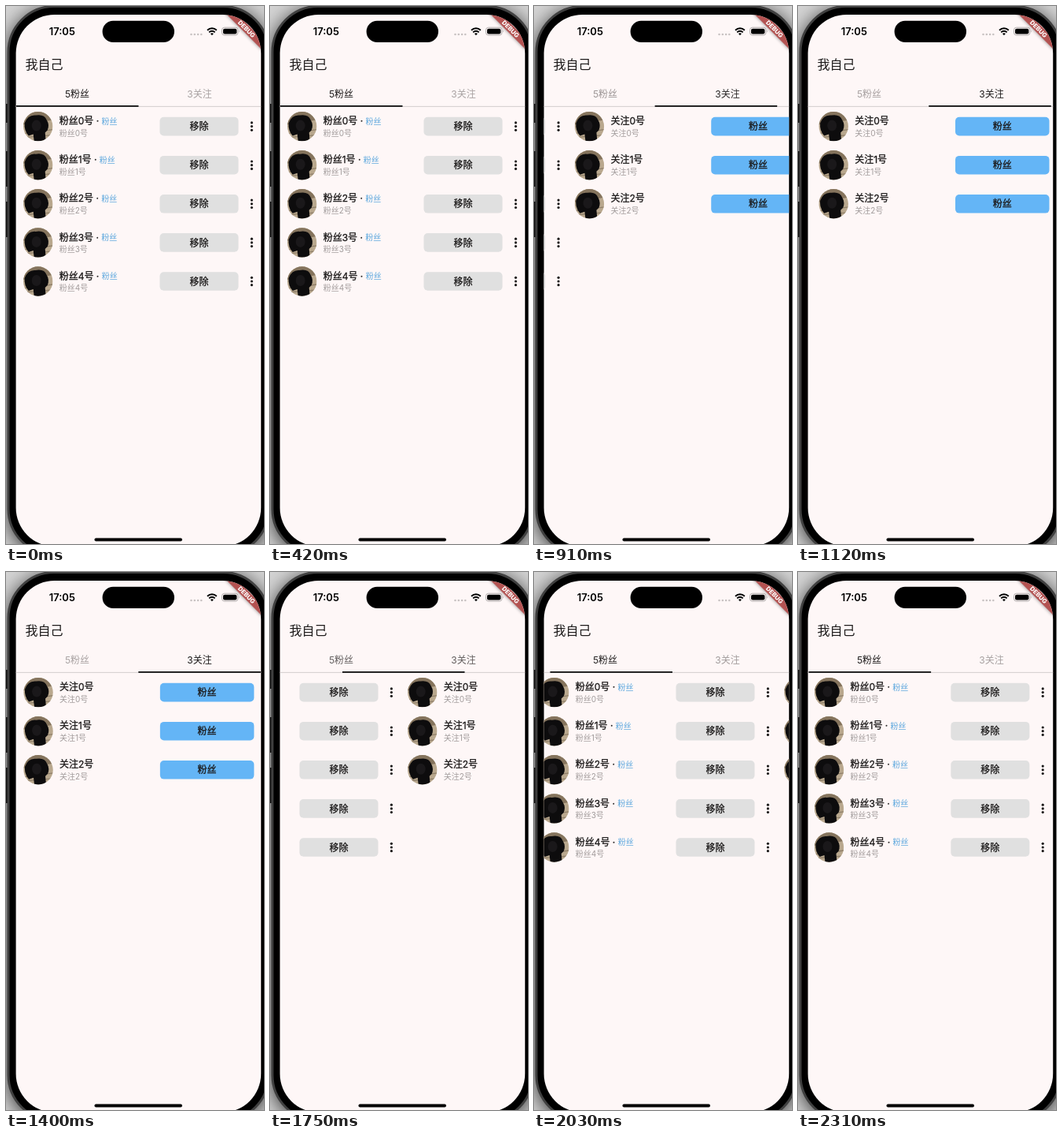
Animation, 328 px wide and 682 px high, one loop 2.38 s. Source, as an HTML page:

```html
<!DOCTYPE html>
<html lang="zh-CN">
<head>
<meta charset="utf-8">
<style>
  html, body { margin: 0; width: 100%; height: 100%; overflow: hidden; background: #000; }
  svg { display: block; }
  text { font: 12px Inter, "Noto Sans CJK SC", sans-serif; fill: #1b1919; }
  .medium { stroke: #1b1919; stroke-width: .3px; }
  .small { font-size: 10px; fill: #a19b9b; }
  .tag { font-size: 10px; fill: #58a5dd; stroke: none; }
  .mid { text-anchor: middle; }
  .title { font-size: 16px; }
  .clock { font-size: 13px; font-weight: 600; fill: #000; }
  .debug { font-size: 7.8px; font-weight: 800; fill: #fff; }
  .banner { filter: drop-shadow(0 0 2px #0007); }
  .phone { filter: drop-shadow(0 4px 12px #000b); }
</style>
</head>
<body>
<svg width="328" height="682" viewBox="0 0 328 682">
  <defs>
    <clipPath id="screen"><rect x="12.6" y="11" width="311.6" height="674" rx="49"/></clipPath>
    <clipPath id="round"><circle r="18.7"/></clipPath>
    <g id="avatar" clip-path="url(#round)">
      <path d="M-19-19h38v38h-38z" fill="#b9a88e"/>
      <path d="M-19-19h38v11L-19-2z" fill="#85745d"/>
      <path d="M-19 9L19 4M-19 14L19 11" stroke="#8f7f69" stroke-width="1.3"/>
      <path d="M-17-4Q-13-15-3-14Q8-16 11-8Q15-2 12 5L9 8L10 19H-5L-6 10L-12 12Q-18 5-17-4z" fill="#0d0c0d"/>
      <ellipse cx="-2" cy="-1" rx="6" ry="7" fill="#1a181a"/>
    </g>
    <g id="more" fill="#1b1919">
      <circle cy="-4.7" r="1.6"/><circle r="1.6"/><circle cy="4.7" r="1.6"/>
    </g>
  </defs>

  <rect width="328" height="682" fill="#d4d4d4"/>
  <path d="M0 124h3v24h-3zM0 184h3v45h-3zM0 248h3v45h-3z" fill="#1c1c1c"/>
  <rect class="phone" x="3" y=".5" width="331" height="695" rx="58" stroke="#404040" stroke-width="3"/>

  <g clip-path="url(#screen)">
    <rect x="12" y="11" width="313" height="675" fill="#fef7f7"/>
    <g id="pages"></g>
    <text class="title" x="24.5" y="80">我自己</text>
    <text class="mid tab" x="90.5" y="115.6">5粉丝</text>
    <text class="mid tab" x="246" y="115.6">3关注</text>
    <path d="M12 127.4H325" stroke="#cfc9c9" stroke-width=".9"/>
    <rect id="bar" x="13" y="126" width="155.5" height="1.8" fill="#111"/>

    <text class="mid clock" x="71.3" y="37">17:05</text>
    <rect x="122.6" y="18.8" width="91.4" height="27.2" rx="13.6"/>
    <path d="M235.5 36h.01M239.8 36h.01M244.1 36h.01M248.3 36h.01" stroke="#c8c2c2" stroke-width="2.6" stroke-linecap="round"/>
    <path d="M256 30.8a8.3 8.3 0 0 1 11.8 0M258.2 33.4a5.1 5.1 0 0 1 7.4 0" fill="none" stroke="#000" stroke-width="2"/>
    <path d="M261.9 37.2l-2-2.1a2.9 2.9 0 0 1 4 0z"/>
    <rect x="274.5" y="27.2" width="20.4" height="9.8" rx="3.2" fill="none" stroke="#a9a4a4" stroke-width=".9"/>
    <rect x="276" y="28.7" width="17.4" height="6.8" rx="2"/>
    <path d="M296 30.5q1.4 1.6 0 3.2z" fill="#a9a4a4"/>

    <g transform="translate(305.9 29.1) rotate(45)">
      <rect class="banner" x="-32" y="-4.9" width="64" height="9.8" fill="#b35251"/>
      <text class="mid debug" y="2.8">DEBUG</text>
    </g>
    <rect x="112.5" y="674.6" width="111.5" height="3.8" rx="1.9"/>
  </g>
</svg>
<script>
const LOOP = 2380, STEP = 70, WIDTH = 311;
const pages = document.getElementById('pages');
const bar = document.getElementById('bar');
const tabs = document.querySelectorAll('.tab');

const button = (width, color, label) => `
  <rect x="195.5" y="-11.8" width="${width}" height="23.6" rx="5" fill="${color}"/>
  <text class="medium mid" x="${195.5 + width / 2}" y="4.6">${label}</text>`;

const row = (name, i, tag, action) => `
  <g transform="translate(0 ${152.6 + 49.1 * i})">
    <use href="#avatar" x="40.7"/>
    <text class="medium" x="67.7" y="-2.4">${name}${i}号${tag}</text>
    <text class="small" x="67.7" y="12.3">${name}${i}号</text>
    ${action}
  </g>`;

const list = (count, name, tag, action) =>
  Array.from({ length: count }, (_, i) => row(name, i, tag, action)).join('');

pages.innerHTML =
  list(5, '粉丝', ' · <tspan class="tag" dy="-.6">粉丝</tspan>', button(100, '#e0e0e0', '移除') + '<use href="#more" x="312.4"/>') +
  `<g transform="translate(${WIDTH})">${list(3, '关注', '', button(119.5, '#64b5f6', '粉丝'))}</g>`;

// Overdamped page spring: distance left, ms after release
const spring = (start, slow, ms) =>
  slow * Math.exp(-.00908 * ms) + (start - slow) * Math.exp(-.02203 * ms);

function scrollAt(t) {
  if (t < 490) return 0;
  if (t < 700) return 167 * (t - 490) / 210;
  if (t < 1470) return WIDTH - spring(144, 204, t - 700);
  if (t < 1610) return WIDTH;
  if (t < 1750) return WIDTH - 153 * (t - 1610) / 140;
  return spring(158, 191.5, t - 1750);
}

function tabColor(active) {
  const mix = (off, on) => Math.round(off + (on - off) * active);
  return `rgb(${mix(168, 27)},${mix(162, 25)},${mix(162, 25)})`;
}

function draw(now) {
  const t = Math.floor(now % LOOP / STEP) * STEP;
  const x = scrollAt(t), part = x / WIDTH;
  pages.setAttribute('transform', `translate(${-x})`);
  bar.setAttribute('x', 13 + x / 2);
  tabs[0].style.fill = tabColor(1 - part);
  tabs[1].style.fill = tabColor(part);
}

const begin = performance.now();
function tick() {
  draw(performance.now() - begin);
  requestAnimationFrame(tick);
}
tick();
</script>
</body>
</html>
```
